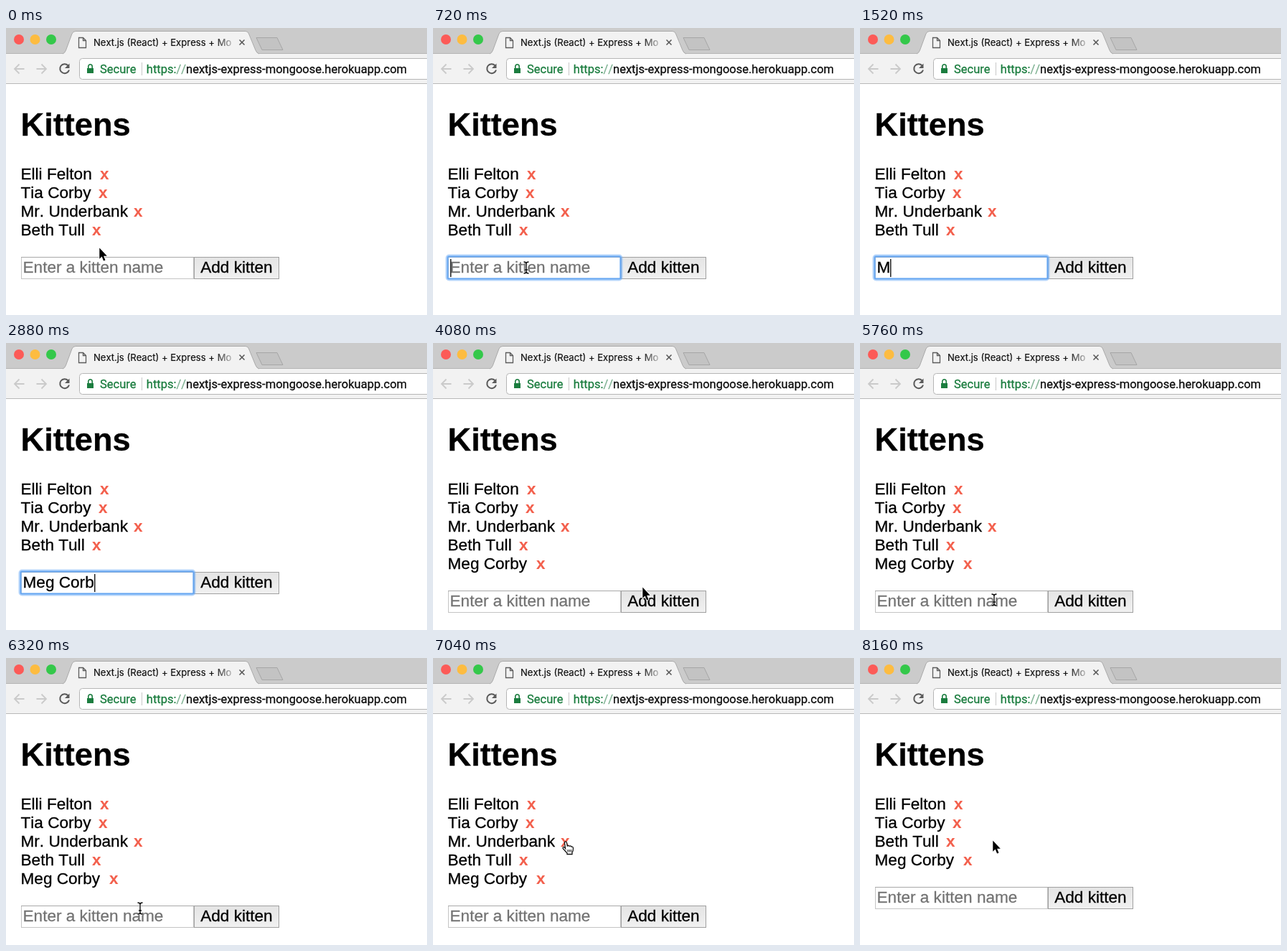
Write an HTML page with a canvas that moves like this. It is 587 by 400 pixels and loops after 8240 ms.

```html
<!DOCTYPE html>
<html lang="en">
<head>
<meta charset="utf-8">
<title>Kittens</title>
<style>
html, body { margin: 0; width: 100%; height: 100%; overflow: hidden; background: #fff; }
canvas { display: block; width: 587px; height: 400px; }
</style>
</head>
<body>
<canvas id="stage" width="587" height="400"></canvas>
<script>
const ctx = document.getElementById('stage').getContext('2d');
const LOOP = 8240, STEP = 80;
const SANS = '"Liberation Sans", Arial, sans-serif';
const UI = 'Roboto, sans-serif';
const BODY = '22.6px ' + SANS;

// name and x position of its delete mark
const kittens = [['Elli Felton', 131], ['Tia Corby', 129], ['Mr. Underbank', 178], ['Beth Tull', 120]];
const newcomer = ['Meg Corby', 144];
const FOCUS = 720, TYPE = 1400, KEY = 195, SHOW = 3440, BLUR = 3920, ADD = 4080, REMOVE = 7520;

// time, x, y of the pointer tip
const path = [[0, 130, 306], [160, 130, 306], [560, 130, 334], [SHOW, 130, 334], [3840, 292, 340],
  [4560, 292, 340], [5200, 187, 358], [6200, 187, 358], [6880, 185, 254], [LOOP, 185, 254]];

// A hairline outline gives the text a slightly heavier weight
function text(str, x, y, font, color, weight = 0.3) {
  ctx.font = font;
  ctx.fillStyle = ctx.strokeStyle = color;
  ctx.lineWidth = weight;
  ctx.fillText(str, x, y);
  ctx.strokeText(str, x, y);
  return x + ctx.measureText(str).width;
}

function poly(points, fill, stroke, width) {
  ctx.beginPath();
  points.forEach(([x, y], i) => i ? ctx.lineTo(x, y) : ctx.moveTo(x, y));
  ctx.closePath();
  paint(fill, stroke, width);
}

function paint(fill, stroke, width = 1) {
  if (fill) { ctx.fillStyle = fill; ctx.fill(); }
  if (stroke) { ctx.strokeStyle = stroke; ctx.lineWidth = width; ctx.stroke(); }
}

function line(d, color, width) {
  ctx.strokeStyle = color;
  ctx.lineWidth = width;
  ctx.stroke(new Path2D(d));
}

function rect(x, y, w, h, color) {
  ctx.fillStyle = color;
  ctx.fillRect(x, y, w, h);
}

function shade(x0, y0, x1, y1, from, to) {
  const g = ctx.createLinearGradient(x0, y0, x1, y1);
  g.addColorStop(0, from);
  g.addColorStop(1, to);
  return g;
}

function drawBrowser() {
  rect(0, 0, 587, 36, '#cbcbcb');
  rect(0, 35, 587, 1, '#b4b4b4');
  rect(0, 36, 587, 41, '#f2f2f2');
  rect(0, 77, 587, 1, '#b8b8b8');

  [['#fc5b57', 18], ['#fdbc40', 40.5], ['#34c84a', 63]].forEach(([color, x]) => {
    ctx.beginPath();
    ctx.arc(x, 16, 7, 0, 7);
    paint(color);
  });

  const tab = new Path2D('M79 36 Q82 35 83.500 31 L92 8 Q93.500 4.500 97 4.500 H334 Q337 4.500 338.500 8 L348 31 Q349.500 35 353 36');
  ctx.fillStyle = '#f2f2f2';
  ctx.fill(tab);
  ctx.strokeStyle = '#aaa';
  ctx.lineWidth = 1;
  ctx.stroke(tab);
  rect(80, 36, 272, 1, '#f2f2f2');
  poly([[349, 13.5], [378, 13.5], [386, 30.5], [357, 30.5]], '#c3c3c3', '#a6a6a6');

  line('M101.500 13.500 H107.500 L111.500 17.500 V27.500 H101.500 Z M107.500 13.500 V17.500 H111.500', '#5c5c5c', 1.3);
  text('Next.js (React) + Express + Mo', 122, 25, '13.1px Inter, sans-serif', shade(290, 0, 323, 0, '#111', 'rgba(17,17,17,0)'), 0.2);
  line('M325.500 16.500 L332.500 23.500 M332.500 16.500 L325.500 23.500', '#555', 1.5);

  line('M25.500 57 H12 M18.500 50.500 L12 57 L18.500 63.500', '#cacaca', 1.8);
  line('M42.500 57 H56 M49.500 50.500 L56 57 L49.500 63.500', '#cacaca', 1.8);
  line('M86.500 52.200 A6.500 6.500 0 1 0 88 58.500', '#5a5a5a', 2);
  poly([[88.5, 49.5], [88.5, 56], [82, 56]], '#5a5a5a');

  ctx.beginPath();
  ctx.roundRect(102.5, 42.5, 500, 29, 4);
  paint('#fff', '#b6b6b6');
  rect(113, 56, 9, 7, '#1b7d3f');
  line('M114.800 56 V53.500 A2.700 2.700 0 0 1 120.200 53.500 V56', '#1b7d3f', 1.6);
  const font = '16.5px ' + UI;
  text('Secure', 131, 63, font, '#1b7d3f');
  rect(189, 48, 1, 18, '#c8c8c8');
  let x = text('https:', 195.8, 63, font, '#1b7d3f');
  x = text('//', x, 63, font, '#80b394');
  text('nextjs-express-mongoose.herokuapp.com', x, 63, font, '#0c0c0c');
}

function drawList(rows) {
  text('Kittens', 20.5, 150, 'bold 45.2px ' + SANS, '#000');
  rows.forEach(([name, markX], i) => {
    const y = 211 + 26 * i;
    text(name, 20.5, y, BODY, '#000');
    text('x', markX, y, 'bold 22.5px ' + SANS, '#f3604d', 0.1);
  });
}

function drawForm(t, top) {
  const focused = t >= FOCUS && t < BLUR;
  const count = t >= ADD ? 0 : Math.max(0, Math.min(9, Math.floor((t - TYPE) / KEY) + 1));
  const typed = newcomer[0].slice(0, count);
  const base = top + 22;

  rect(262, top, 119, 31, '#a0a0a0');
  rect(263, top + 1, 117, 29, shade(0, top, 0, top + 31, '#e4e4e4', '#f1f1f1'));
  text('Add kitten', 271.2, base, BODY, '#000');

  rect(21, top, 241, 31, '#c4c4c4');
  rect(21, top, 241, 1, '#a8a8a8');
  rect(22, top + 1, 239, 29, '#fff');
  if (focused) {
    ctx.beginPath();
    ctx.roundRect(19.5, top - 1.5, 243, 33, 3);
    paint(null, 'rgba(120,178,247,.55)', 4);
    ctx.beginPath();
    ctx.roundRect(20.5, top - 0.5, 241, 31, 1.5);
    paint(null, '#69a8f2', 2);
  }
  const end = typed ? text(typed, 23.5, base, BODY, '#000') : 23.5;
  if (!typed) text('Enter a kitten name', 23.5, base, BODY, '#737373');

  const lastKey = TYPE + 8 * KEY;
  const blinkFrom = t < TYPE ? FOCUS : lastKey;
  const lit = (t >= TYPE && t < lastKey) || (t - blinkFrom) % 1000 < 500;
  if (focused && lit) rect(Math.round(end), top + 3, 1.5, 25, '#222');
}

function pointerAt(t) {
  const i = path.findIndex(p => p[0] > t);
  const [t0, x0, y0] = path[i - 1], [t1, x1, y1] = path[i];
  const u = (t - t0) / (t1 - t0), e = u * u * (3 - 2 * u);
  return [x0 + (x1 - x0) * e, y0 + (y1 - y0) * e];
}

function drawArrow() {
  const shape = [[0.3, 0.6], [0.3, 15.8], [3.6, 12.6], [6.1, 18.4], [8.5, 17.4], [6.1, 11.7], [10.8, 11.7]];
  ctx.lineJoin = 'round';
  poly(shape, null, '#fff', 2);
  poly(shape, '#000');
  ctx.lineJoin = 'miter';
}

function drawBeam() {
  const d = 'M-3.500 -8 Q0 -8 0 -5.500 Q0 -8 3.500 -8 M0 -6 V6 M-3.500 8 Q0 8 0 5.500 Q0 8 3.500 8 M-2 3 H2';
  line(d, 'rgba(255,255,255,.8)', 3);
  line(d, '#111', 1.4);
}

function drawHand() {
  const d = 'M-1.500 3.500 Q-1.500 1.800 0 1.800 Q1.200 1.800 1.500 3.500 L2.300 8 Q4 6.500 5 8.300 Q7 7 7.800 9 Q10.500 8.500 10.500 11.500 Q10.500 15 9 17 V19.500 H2 V18 L-2.500 13 Q-5 10.500 -3.300 9.500 Q-2 9 -.500 11.300 Z';
  ctx.fillStyle = '#fff';
  ctx.fill(new Path2D(d));
  line(d, '#111', 1.3);
  line('M3 13 V16.500 M5.200 13 V16.500 M7.400 13 V16.500', '#111', 1);
}

function drawPointer(t, rows, top) {
  if (t >= TYPE && t < SHOW) return;
  const [x, y] = pointerAt(t);
  const inInput = x > 21 && x < 262 && y > top && y < top + 31;
  const onMark = rows.some(([, mx], i) => x > mx && x < mx + 12 && Math.abs(y - 204 - 26 * i) < 13);
  ctx.save();
  ctx.translate(Math.round(x), Math.round(y));
  (inInput ? drawBeam : onMark ? drawHand : drawArrow)();
  ctx.restore();
}

function draw(t) {
  const rows = t < ADD ? kittens.slice() : kittens.concat([newcomer]);
  if (t >= REMOVE) rows.splice(2, 1);
  const top = 215 + 26 * rows.length;
  rect(0, 0, 587, 400, '#fff');
  ctx.fontKerning = 'none';
  drawBrowser();
  drawList(rows);
  drawForm(t, top);
  drawPointer(t, rows, top);
}

const start = performance.now();
function tick() {
  const t = (performance.now() - start) % LOOP;
  draw(Math.floor(t / STEP) * STEP);
  requestAnimationFrame(tick);
}
tick();
</script>
</body>
</html>
```
